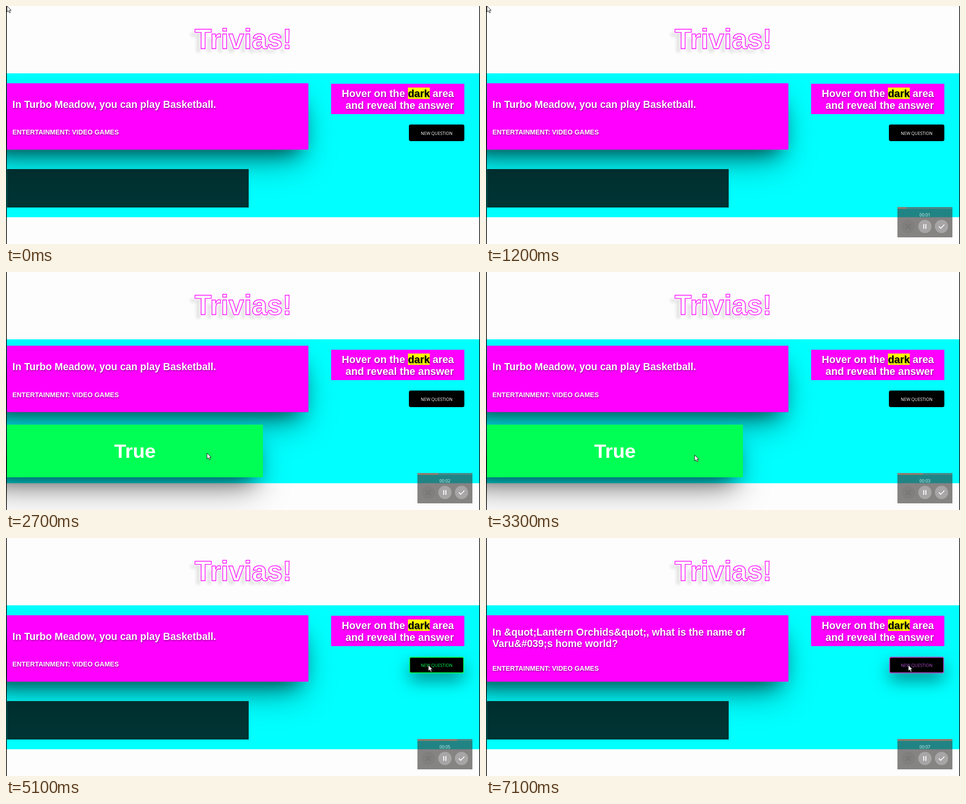
Animation of 1000 by 502 pixels, one loop 7200 ms. Source, as an HTML page with a canvas:

```html
<!DOCTYPE html>
<html lang="en">
<head>
<meta charset="utf-8">
<title>Trivias!</title>
<style>
  html, body { margin: 0; width: 100%; height: 100%; overflow: hidden; background: #fff; }
  canvas { display: block; width: 100vw; height: 100vh; }
</style>
</head>
<body>
<canvas id="stage" width="1000" height="502"></canvas>
<script>
const ctx = document.getElementById('stage').getContext('2d');
const LOOP = 7200, TICK = 100;
const SANS = '"Liberation Sans", Arial, sans-serif';
const UI = '"Open Sans", "Noto Sans", sans-serif';
const MAGENTA = '#ff00ff', CYAN = '#00ffff';
const OFF = 3000;   // shadows are cast from shapes this far outside the stage
const BLEED = 60;   // the cards continue past the left edge

// time, x, y of the pointer tip
const PATH = [
  [0, 2, 0], [1300, 2, 0], [1600, 190, 150], [2000, 385, 285], [2300, 406, 342],
  [2700, 424, 382], [3300, 440, 386], [3600, 620, 340], [4000, 863, 283], [4300, 891, 268]
];

const QUESTIONS = [
  { lines: ['In Turbo Meadow, you can play Basketball.'], y: 214.5, tagY: 271 },
  { lines: ['In &quot;Lantern Orchids&quot;, what is the name of', 'Varu&#039;s home world?'],
    y: 205.5, tagY: 279.5 }
];

const clamp = v => Math.max(0, Math.min(1, v));
const mix = (a, b, k) => a + (b - a) * k;
const ease = k => k * k * (3 - 2 * k);

function blend(a, b, k) {
  return `rgba(${a.map((v, i) => mix(v, b[i], k)).join(',')})`;
}

function rect(x, y, w, h, color) {
  ctx.fillStyle = color;
  ctx.fillRect(x, y, w, h);
}

function rounded(x, y, w, h, r, color) {
  ctx.fillStyle = color;
  ctx.beginPath();
  ctx.roundRect(x, y, w, h, r);
  ctx.fill();
}

function castShadow(x, y, w, h, dy, blur, spread, alpha) {
  ctx.save();
  ctx.shadowColor = `rgba(0,0,0,${alpha})`;
  ctx.shadowBlur = blur;
  ctx.shadowOffsetX = OFF;
  ctx.shadowOffsetY = dy;
  rect(x - spread - OFF, y - spread, w + 2 * spread, h + 2 * spread, '#000');
  ctx.restore();
}

function deepShadow(x, y, w, h, k = 1) {
  castShadow(x - BLEED, y, w + BLEED, h, 37, 73, -15, 0.4 * k);
  castShadow(x - BLEED, y, w + BLEED, h, 22, 44, -20, 0.65 * k);
}

function text(str, x, y, font, color, align = 'left', shadow = false) {
  ctx.save();
  ctx.font = font;
  ctx.fillStyle = color;
  ctx.textAlign = align;
  if (shadow) {
    ctx.shadowColor = 'rgba(0,0,0,.4)';
    ctx.shadowBlur = 3;
    ctx.shadowOffsetX = 1;
    ctx.shadowOffsetY = 2;
  }
  ctx.fillText(str, x, y);
  ctx.restore();
}

function stroke(points, color, width) {
  ctx.strokeStyle = color;
  ctx.lineWidth = width;
  ctx.beginPath();
  points.forEach(([x, y], i) => i ? ctx.lineTo(x, y) : ctx.moveTo(x, y));
  ctx.stroke();
}

function drawTitle() {
  const x = 500.5, y = 89.5;
  ctx.save();
  ctx.font = `bold 58.5px ${SANS}`;
  ctx.textAlign = 'center';
  ctx.lineJoin = 'miter';
  ctx.miterLimit = 4;
  ctx.shadowColor = 'rgba(0,0,0,.11)';
  ctx.shadowBlur = 6;
  ctx.shadowOffsetX = OFF - 10;
  ctx.shadowOffsetY = 8;
  ctx.fillText('Trivias!', x - OFF, y);
  ctx.shadowColor = 'transparent';
  ctx.fillStyle = '#fff';
  ctx.fillText('Trivias!', x, y);
  ctx.strokeStyle = MAGENTA;
  ctx.lineWidth = 1.4;
  ctx.strokeText('Trivias!', x, y);
  ctx.restore();
}

function drawCard(t, hover) {
  const q = QUESTIONS[t < 5800 ? 0 : 1];
  const dy = -7.5 * hover;
  deepShadow(2, 163 + dy, 636, 140);
  rect(2, 163 + dy, 636, 140, MAGENTA);
  q.lines.forEach((line, i) =>
    text(line, 13.5, q.y + dy + i * 24, `bold 21.2px ${SANS}`, '#fff', 'left', true));
  text('ENTERTAINMENT: VIDEO GAMES', 13.5, q.tagY + dy, `bold 14px ${SANS}`, '#fff', 'left', true);
}

function drawAnswer(hover) {
  const y = mix(344, 322, hover), w = mix(510, 540, hover), h = mix(81, 111, hover);
  if (hover) deepShadow(2, y, w, h, hover);
  rect(2, y, w, h, blend([0, 0, 0, 0.8], [0, 255, 85, 1], hover));
  if (hover) text('True', 2 + w / 2, y + 70, `bold 41.5px ${SANS}`, `rgba(255,255,255,${hover})`, 'center');
}

function drawHint() {
  const font = `bold 21.9px ${SANS}`;
  rect(686, 164, 281, 64, MAGENTA);
  text('Hover on the ', 848, 192, font, '#fff', 'right', true);
  rect(848, 172, 46, 24, '#ffff00');
  text('dark', 848, 192, font, '#000', 'left', true);
  text('area', 945, 192, font, '#fff', 'right', true);
  text('and reveal the answer', 945, 217, font, '#fff', 'right', true);
}

function drawButton(t) {
  const hover = ease(clamp((t - 4000) / 300));
  if (hover) castShadow(850, 250, 117, 35, 16, 36, -2, 0.5 * hover);
  rounded(850 + hover, 250 + hover, 117 - 2 * hover, 35 - hover, 4, '#000');
  // the accent drifts between green and violet while hovered
  const phase = Math.abs(((t - 5100) / 2000 + 20) % 2);
  const k = phase > 1 ? 2 - phase : phase;
  const accent = [mix(0, 176, k), mix(255, 80, k), mix(85, 205, k), 1];
  if (hover) {
    ctx.strokeStyle = blend([0, 0, 0, 1], accent, hover);
    ctx.lineWidth = 1.8;
    ctx.beginPath();
    ctx.roundRect(851.5, 251.5, 114, 33, 3);
    ctx.stroke();
  }
  text('NEW QUESTION', 908.5, 271.5, `9px ${UI}`, blend([255, 255, 255, 1], accent, hover), 'center');
}

function drawRecorder(t) {
  rect(868, 424, 116, 64, 'rgba(55,50,50,.6)');
  rect(868, 424, 116, 4, 'rgba(150,145,140,.35)');
  rect(868, 424, Math.min(116, t * 0.01634), 4, 'rgba(170,122,100,.7)');
  text('00:0' + Math.floor(t / 1000), 926, 443.5, `9px ${UI}`, '#d8f4f4', 'center');
  [891, 926, 961].forEach((x, i) =>
    rounded(x - 14, 451, 28, 28, 14, i ? 'rgba(255,255,255,.28)' : 'rgba(0,0,0,.03)'));
  stroke([[886, 460], [896, 470]], '#767070', 1.5);
  stroke([[896, 460], [886, 470]], '#767070', 1.5);
  rect(922.5, 460, 2, 10, '#fff');
  rect(927, 460, 2, 10, '#fff');
  stroke([[955.5, 465], [959.5, 469], [967, 461]], '#fff', 1.8);
}

function pointerAt(t) {
  const i = PATH.findIndex(p => p[0] > t);
  if (i < 0) return PATH[PATH.length - 1].slice(1);
  const [t0, x0, y0] = PATH[i - 1], [t1, x1, y1] = PATH[i];
  const k = ease((t - t0) / (t1 - t0));
  return [mix(x0, x1, k), mix(y0, y1, k)];
}

function drawPointer(t) {
  const [x, y] = pointerAt(t);
  ctx.save();
  ctx.translate(x, y);
  const arrow = new Path2D('M0 0V12.5L3 9.8L5.2 14.5L7.3 13.5L5.2 9H9Z');
  ctx.fillStyle = '#fff';
  ctx.fill(arrow);
  ctx.strokeStyle = '#111';
  ctx.lineWidth = 1;
  ctx.stroke(arrow);
  ctx.restore();
}

function draw(t) {
  rect(0, 0, 1000, 502, '#fefdfe');
  drawTitle();
  rect(0, 142, 1000, 303.5, CYAN);
  const hover = t < 3300 ? ease(clamp((t - 2400) / 300)) : 1 - ease(clamp((t - 3300) / 300));
  drawCard(t, hover);
  drawAnswer(hover);
  drawHint();
  drawButton(t);
  rect(0, 0, 1.5, 502, '#000');
  rect(998.5, 0, 1.5, 502, '#111');
  if (t >= TICK) drawRecorder(t);
  drawPointer(t);
}

const start = performance.now();
function frame() {
  const t = (performance.now() - start) % LOOP;
  draw(Math.floor(t / TICK) * TICK);
  requestAnimationFrame(frame);
}
frame();
</script>
</body>
</html>
```
